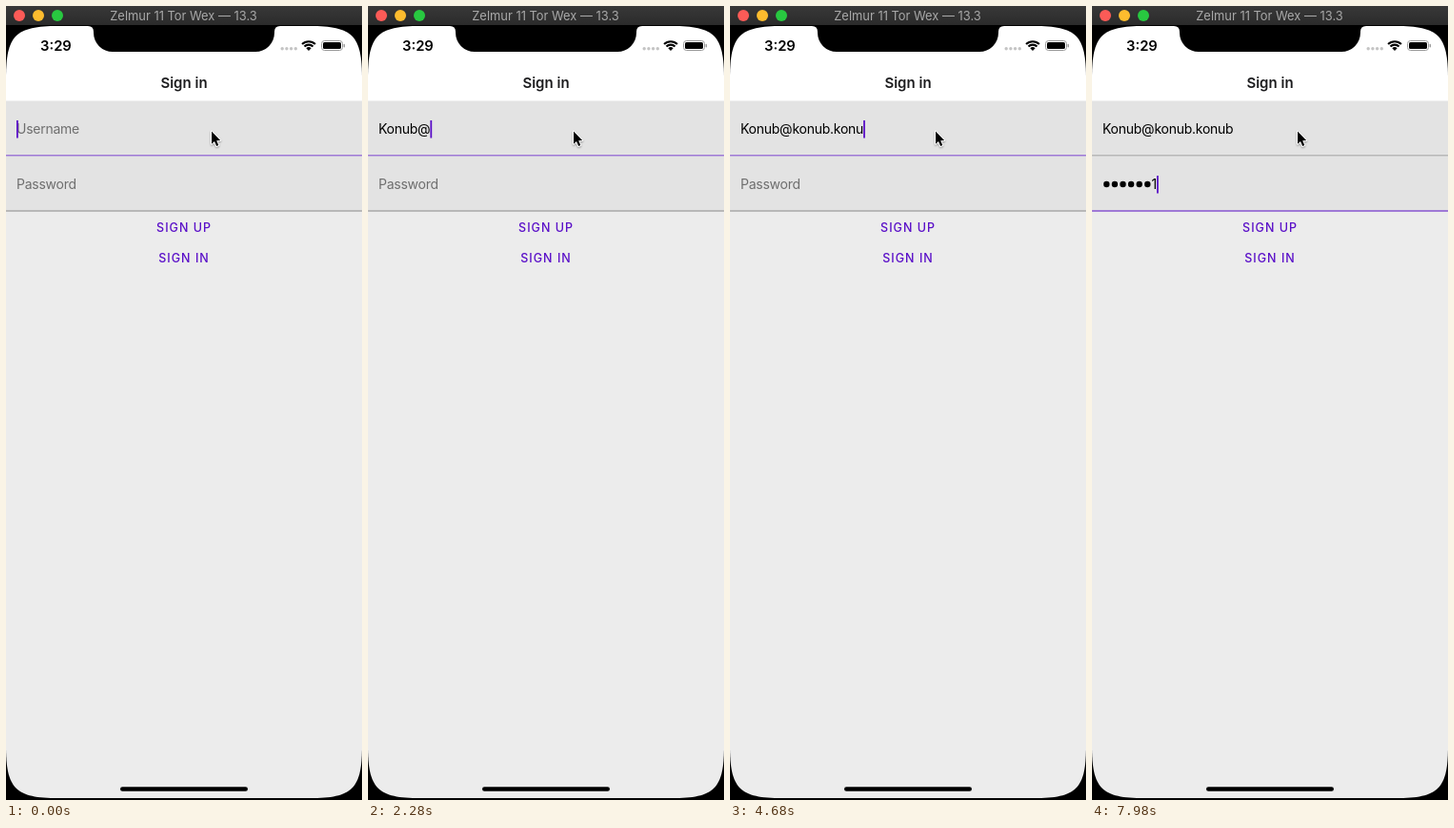
Write an HTML page with a canvas that moves like this. It is 374x833 px and loops after 8000 ms.

```html
<!DOCTYPE html>
<html lang="en">
<head>
<meta charset="utf-8">
<title>Sign in</title>
<style>
html, body { margin: 0; width: 100%; height: 100%; overflow: hidden; background: #000; }
canvas { display: block; width: 374px; height: 833px; }
</style>
</head>
<body>
<canvas id="stage"></canvas>
<script>
const W = 374, H = 833, LOOP = 8000, STEP = 60;
const PURPLE = '#5a0fc8';
const canvas = document.getElementById('stage');
const ctx = canvas.getContext('2d');
const dpr = window.devicePixelRatio || 1;
canvas.width = W * dpr;
canvas.height = H * dpr;

const USER = 'Konub@konub.konub';
const PASS = 'konub11';
const FOCUS_PASS = 5040;
const DOT_STEP = 8.6;

// Time at which each character appears
const userKeys = [780, 840, 1080, 1200, 1380, 2280, 2580, 2760, 2940,
                  3000, 3120, 3780, 4080, 4320, 4440, 4560, 4740];
const passKeys = [5520, 5580, 5760, 6000, 6240, 7200, 7860];
const allKeys = [...userKeys, FOCUS_PASS, ...passKeys];
const MASK_DELAY = 560;

// Caret blinks: start of fade out, start of fade in
const blinks = [[300, 660], [1620, 1740], [3420, 3720], [6540, 7020], [7680, 7860]];

const clamp = v => Math.max(0, Math.min(1, v));
const countTyped = (keys, t) => keys.filter(k => k <= t).length;

function caretAlpha(t) {
  const blink = blinks.filter(b => b[0] <= t).pop();
  if (!blink || allKeys.some(k => k > blink[0] && k <= t)) return 1;
  const fade = from => clamp((t - from + STEP) / 240);
  return Math.max(1 - fade(blink[0]), fade(blink[1]));
}

function rect(x, y, w, h, color) {
  ctx.fillStyle = color;
  ctx.fillRect(x, y, w, h);
}

function rounded(x, y, w, h, r, color) {
  ctx.fillStyle = color;
  ctx.beginPath();
  ctx.roundRect(x, y, w, h, r);
  ctx.fill();
}

function disc(x, y, r, color) {
  ctx.fillStyle = color;
  ctx.beginPath();
  ctx.arc(x, y, r, 0, Math.PI * 2);
  ctx.fill();
}

function text(str, x, y, { size = 14, weight = 400, color = '#000', align = 'left', spacing = 0 } = {}) {
  ctx.font = `${weight} ${size}px Inter, "Open Sans", sans-serif`;
  ctx.letterSpacing = spacing + 'px';
  ctx.fillStyle = color;
  ctx.textAlign = align;
  ctx.fillText(str, x, y);
  return ctx.measureText(str).width;
}

const fieldText = (str, x, y, color) => text(str, x, y, { color, spacing: -0.25 });

function drawTitleBar() {
  const g = ctx.createLinearGradient(0, 0, 0, 20);
  g.addColorStop(0, '#383838');
  g.addColorStop(1, '#2b2b2b');
  rect(0, 0, W, 20, g);
  ['#fc5b57', '#fdbc2e', '#28c840'].forEach((c, i) => disc(14 + 20 * i, 10, 6, c));
  text('Zelmur 11 Tor Wex — 13.3', 186.5, 15, { size: 12.9, color: '#a8a8a8', align: 'center' });
}

// Continuous-curvature corners: the curve starts well before a plain arc would
function screenPath(x0, y0, x1, y1, r) {
  const a = 1.53 * r, c = 0.27 * r;
  ctx.beginPath();
  ctx.moveTo(x0, y0 + a);
  ctx.bezierCurveTo(x0, y0 + c, x0 + c, y0, x0 + a, y0);
  ctx.lineTo(x1 - a, y0);
  ctx.bezierCurveTo(x1 - c, y0, x1, y0 + c, x1, y0 + a);
  ctx.lineTo(x1, y1 - a);
  ctx.bezierCurveTo(x1, y1 - c, x1 - c, y1, x1 - a, y1);
  ctx.lineTo(x0 + a, y1);
  ctx.bezierCurveTo(x0 + c, y1, x0, y1 - c, x0, y1 - a);
  ctx.closePath();
}

function drawScreen() {
  ctx.save();
  screenPath(0, 21, W, 831, 36);
  ctx.clip();
  rect(0, 20, W, 80, '#fff');
  rect(0, 100, W, 733, '#ececec');
  ctx.restore();
}

function drawNotch() {
  ctx.fillStyle = '#000';
  ctx.beginPath();
  ctx.moveTo(86, 20);
  ctx.lineTo(288, 20);
  ctx.lineTo(288, 21);
  ctx.quadraticCurveTo(282, 21, 282, 27);
  ctx.arcTo(282, 48, 262, 48, 20);
  ctx.lineTo(112, 48);
  ctx.arcTo(92, 48, 92, 27, 20);
  ctx.lineTo(92, 27);
  ctx.quadraticCurveTo(92, 21, 86, 21);
  ctx.fill();
}

function drawWifi(x, y) {
  const arc = r => ctx.arc(x, y, r, -Math.PI * 0.75, -Math.PI * 0.25);
  ctx.strokeStyle = ctx.fillStyle = '#000';
  ctx.lineWidth = 2.1;
  for (const r of [9.8, 6.4]) {
    ctx.beginPath();
    arc(r);
    ctx.stroke();
  }
  ctx.beginPath();
  ctx.moveTo(x, y);
  arc(3.8);
  ctx.fill();
}

function drawStatus() {
  text('3:29', 36, 47, { size: 14.8, weight: 600 });
  for (let i = 0; i < 4; i++) disc(290.2 + 4.7 * i, 44.8, 1.7, '#c4c4c4');
  drawWifi(318, 47);
  ctx.strokeStyle = '#9b9b9b';
  ctx.lineWidth = 1;
  ctx.beginPath();
  ctx.roundRect(331.5, 36.5, 22, 10, 3);
  ctx.stroke();
  rounded(333, 38, 19, 7, 1.6, '#000');
  rounded(354.6, 39.8, 1.4, 3.6, 0.7, '#9b9b9b');
  text('Sign in', 187, 86, { size: 15, weight: 600, color: '#1c1c1e', align: 'center' });
}

function drawField(y, focused) {
  rect(0, y, W, 58, '#e3e3e3');
  rect(0, y + 57, W, 1, focused ? PURPLE : '#8c8c8c');
}

function drawCaret(x, y, alpha) {
  ctx.globalAlpha = alpha;
  rect(x, y, 1.8, 18.5, PURPLE);
  ctx.globalAlpha = 1;
}

function drawUser(t) {
  const focused = t < FOCUS_PASS;
  const n = countTyped(userKeys, t);
  drawField(99.5, focused);
  let x = 11;
  if (n) x += fieldText(USER.slice(0, n), 11, 134, '#000');
  else fieldText('Username', 11, 134, '#6e6e6e');
  if (focused) drawCaret(x, 120, caretAlpha(t));
}

function drawPass(t) {
  const focused = t >= FOCUS_PASS;
  const n = countTyped(passKeys, t);
  drawField(157.5, focused);
  let x = 11;
  if (!n) fieldText('Password', 11, 192, '#6e6e6e');
  for (let i = 0; i < n; i++) {
    const masked = i < n - 1 || t - passKeys[i] > MASK_DELAY;
    if (masked) disc(x + 4.3, 187, 3.2, '#000');
    x += masked ? DOT_STEP : fieldText(PASS[i], x, 192, '#000');
  }
  if (focused) drawCaret(x, 178, caretAlpha(t));
}

function drawButtons() {
  const style = { size: 12.5, weight: 500, color: PURPLE, align: 'center', spacing: 1 };
  text('SIGN UP', 187, 236.5, style);
  text('SIGN IN', 187, 268.5, style);
}

function drawPointer(x, y) {
  ctx.save();
  ctx.beginPath();
  ctx.moveTo(x, y);
  [[0, 13.2], [3, 10.5], [5.2, 15.5], [7.3, 14.6], [5.2, 9.7], [9.2, 9.5]]
    .forEach(([dx, dy]) => ctx.lineTo(x + dx, y + dy));
  ctx.closePath();
  ctx.lineJoin = 'round';
  ctx.lineWidth = 2;
  ctx.strokeStyle = '#fff';
  ctx.shadowColor = 'rgba(0,0,0,.35)';
  ctx.shadowBlur = 2 * dpr;
  ctx.shadowOffsetY = dpr;
  ctx.stroke();
  ctx.shadowColor = 'transparent';
  ctx.fillStyle = '#000';
  ctx.fill();
  ctx.restore();
}

function draw(now) {
  const t = Math.floor((now % LOOP) / STEP) * STEP;
  ctx.setTransform(dpr, 0, 0, dpr, 0, 0);
  rect(0, 0, W, H, '#000');
  drawTitleBar();
  drawScreen();
  drawNotch();
  drawStatus();
  drawUser(t);
  drawPass(t);
  drawButtons();
  rounded(120, 819.2, 134, 4.6, 2.3, '#000');
  drawPointer(216, 131.5);
}

const start = performance.now();
function tick() {
  draw(performance.now() - start);
  requestAnimationFrame(tick);
}
tick();
</script>
</body>
</html>
```
